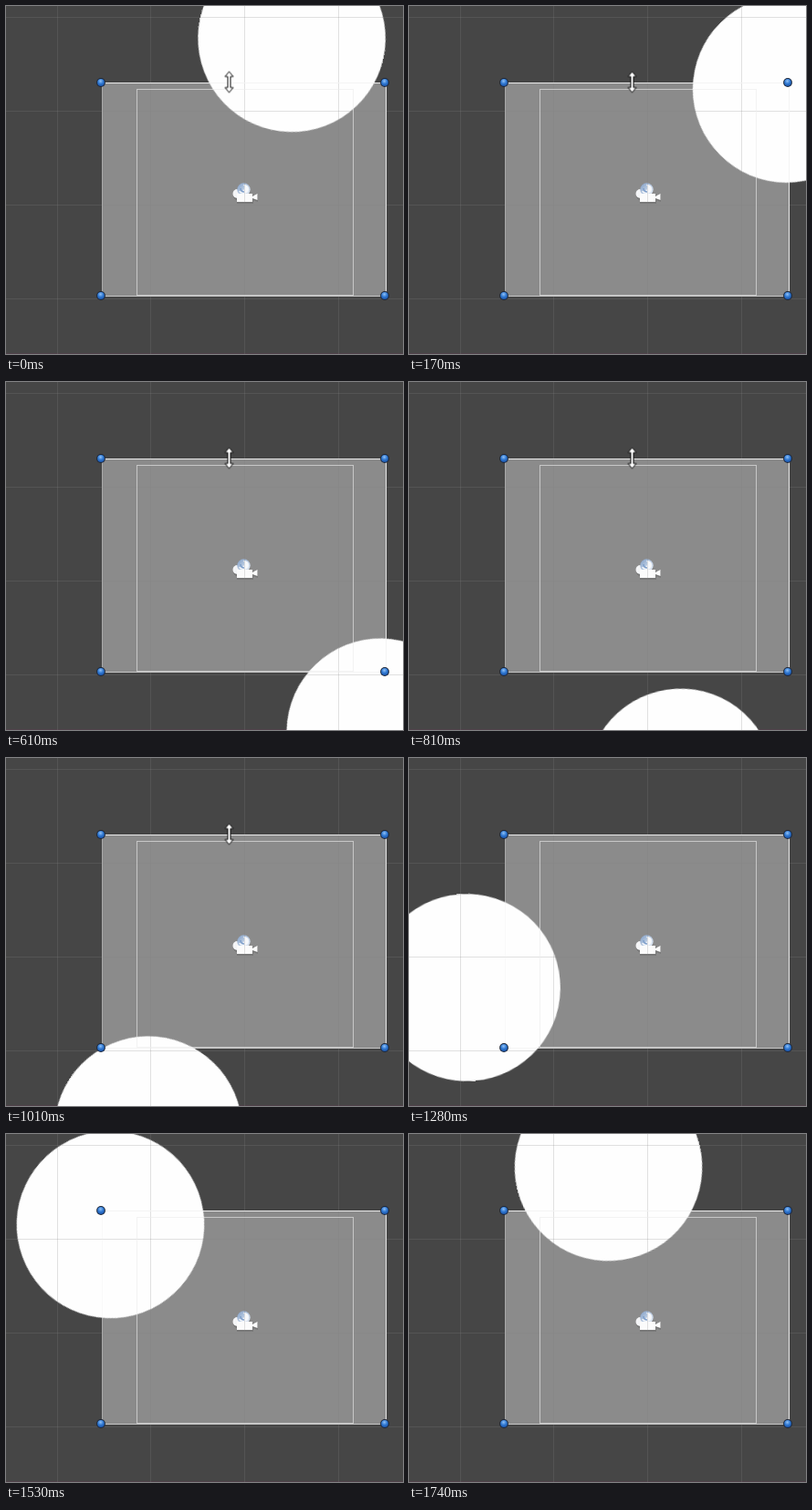
These frames come from a looping animation (435 px wide and 382 px high, 1.84 s). An HTML page:

```html
<!DOCTYPE html>
<html lang="en">
<head>
<meta charset="utf-8">
<title>Orbiting circle</title>
<style>
html, body { margin: 0; width: 100%; height: 100%; overflow: hidden; background: #464646; }
svg { display: block; width: 435px; height: 382px; }

.orbit {
  transform-origin: 268px 236px;
  animation: orbit 1840ms infinite;
}
.cursor { animation: leave 1840ms infinite; }

/* One jump per tick of about 30 ms; flat pairs are the longer ticks. */
@keyframes orbit {
  0%      { transform: rotate(12.68deg); animation-timing-function: steps(9); }
  14.67%  { transform: rotate(71.15deg); animation-timing-function: step-end; }
  15.21%  { transform: rotate(71.15deg); animation-timing-function: steps(2); }
  18.47%  { transform: rotate(84.15deg); animation-timing-function: steps(7); }
  29.89%  { transform: rotate(124deg); animation-timing-function: steps(2); }
  33.15%  { transform: rotate(136.18deg); animation-timing-function: steps(7); }
  44.56%  { transform: rotate(177.6deg); animation-timing-function: step-end; }
  45.1%   { transform: rotate(177.6deg); animation-timing-function: steps(6); }
  54.89%  { transform: rotate(213.07deg); animation-timing-function: steps(3); }
  59.78%  { transform: rotate(228.5deg); animation-timing-function: steps(6); }
  69.56%  { transform: rotate(265.54deg); animation-timing-function: steps(3); }
  74.45%  { transform: rotate(282.8deg); animation-timing-function: step-end; }
  75%     { transform: rotate(282.8deg); animation-timing-function: steps(5); }
  83.15%  { transform: rotate(311.65deg); animation-timing-function: steps(4); }
  89.67%  { transform: rotate(336.2deg); animation-timing-function: step-end; }
  91.84%  { transform: rotate(341.1deg); animation-timing-function: step-end; }
  94.56%, 100% { transform: rotate(346.07deg); }
}
@keyframes leave {
  0%     { transform: translate(244.5px, 83.5px); animation-timing-function: step-end; }
  59.78% { transform: translate(244.5px, 83.5px); animation-timing-function: steps(4); }
  66.3%, 100% { transform: translate(371px, -14px); }
}
</style>
</head>
<body>
<svg viewBox="0 0 435 382">
  <defs>
    <radialGradient id="blue" cx=".45" cy=".3" r=".7">
      <stop offset="0" stop-color="#8fc0f5"/>
      <stop offset=".55" stop-color="#2f78d2"/>
      <stop offset="1" stop-color="#1d55a8"/>
    </radialGradient>
    <linearGradient id="reel" x1="0" y1="0" x2="1" y2="1">
      <stop offset="0" stop-color="#7f9cc4"/>
      <stop offset=".5" stop-color="#b9cbe2"/>
      <stop offset="1" stop-color="#eef2f7"/>
    </linearGradient>
    <g id="handle">
      <circle r="4.9" fill="#1c2638"/>
      <circle r="3.9" fill="url(#blue)"/>
    </g>
  </defs>

  <rect width="435" height="382" fill="#464646"/>
  <rect y="381" width="435" height="1" fill="#50424a"/>
  <rect x="105" y="84" width="312" height="235" fill="#8b8b8b"/>

  <g class="orbit"><circle cx="268" cy="30.5" r="102.8" fill="#fefefe"/></g>

  <!-- camera icon -->
  <g>
    <path d="M249 206a5 5 0 0 1 4-5 8 7.500 0 0 1 15 1l-1 4h4v3l5-3v8l-5-2v4h-18v-4a5 5 0 0 1-4-6z"
          fill="#555" opacity=".35" transform="translate(0 1)"/>
    <circle cx="253.500" cy="206" r="5" fill="#f4f5f7"/>
    <circle cx="260.500" cy="201.500" r="7.200" fill="url(#reel)"/>
    <path d="M260 196q6 0 6 5t-6 5q-4 0-5-3 5 1 6-2t-1-5z" fill="#f6f8fb"/>
    <path d="M257 200q0 4 4 4" fill="none" stroke="#7e9fca" stroke-width="1.500"/>
    <path d="M253 206h17v3l5.500-3v7l-5.500-2v4h-17z" fill="#fbfbfb"/>
  </g>

  <path d="M56.500 0V382M158.500 0V382M261.500 0V382M364.500 0V382M0 12.500H435M0 115.500H435M0 218.500H435M0 321.500H435"
        stroke="#808080" stroke-opacity=".24" fill="none"/>

  <g fill="none">
    <rect x="143.500" y="91.500" width="237" height="226" stroke="#ececec" stroke-opacity=".62"/>
    <path d="M105.500 84V319" stroke="#eee" stroke-opacity=".3"/>
    <path d="M105 318.500H417" stroke="#eee" stroke-opacity=".6"/>
    <path d="M105 84.500H416.500V319" stroke="#f4f4f4" stroke-opacity=".92"/>
  </g>

  <use href="#handle" x="104" y="84"/>
  <use href="#handle" x="415" y="84"/>
  <use href="#handle" x="104" y="318"/>
  <use href="#handle" x="415" y="318"/>

  <g class="cursor">
    <path d="M0-11.500 4.500-6H1.500V6H4.500L0 11.500-4.500 6H-1.500V-6H-4.500z"
          fill="#fff" stroke="#111" stroke-width="1"/>
  </g>
</svg>
</body>
</html>
```
